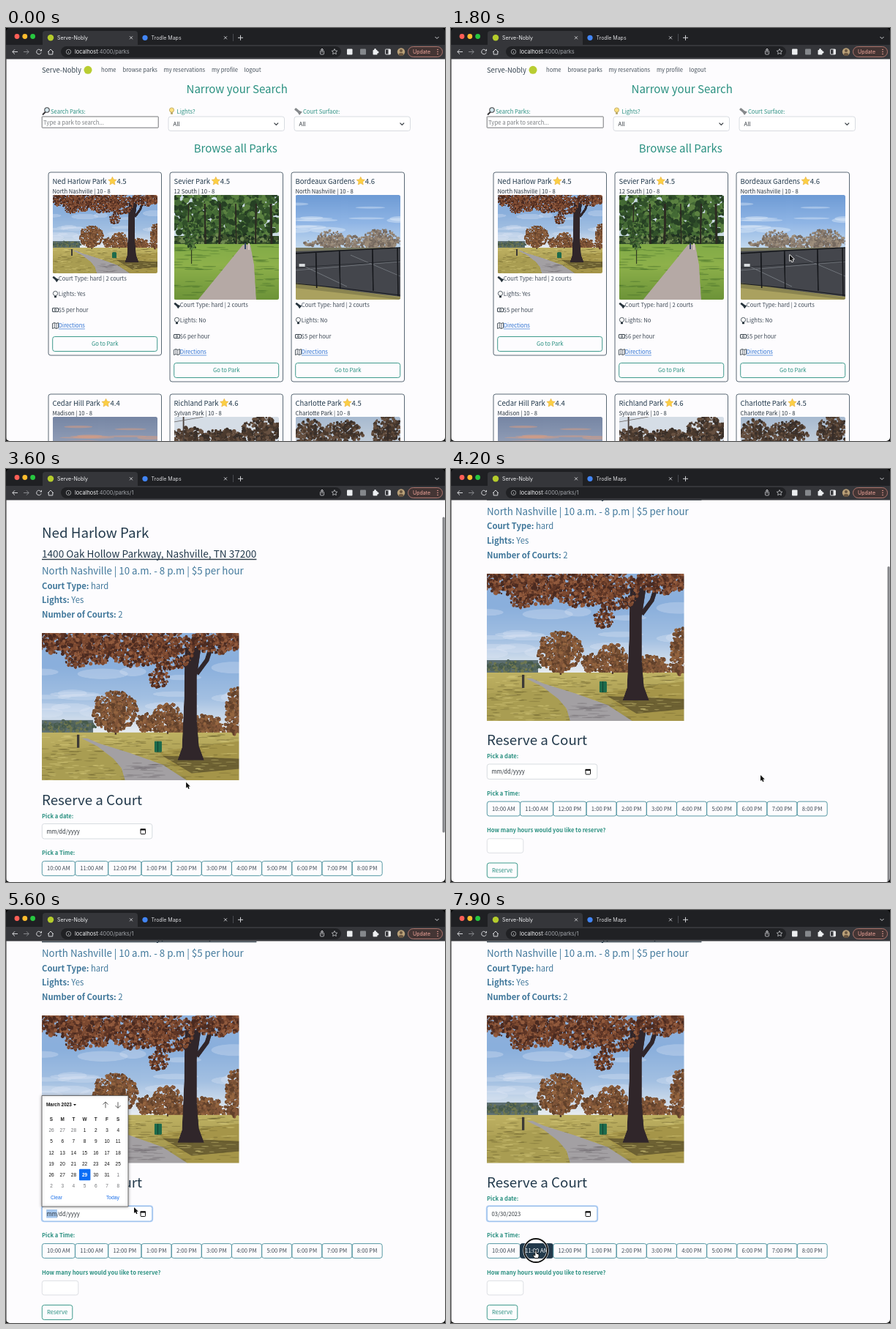
An HTML page with a canvas that plays this animation: 600x564 px, repeating every 8 s.

```html
<!DOCTYPE html>
<html lang="en">
<head>
<meta charset="utf-8">
<title>Court booking</title>
<style>
html, body { margin: 0; width: 100%; height: 100%; overflow: hidden; background: #000; }
canvas { display: block; width: 600px; height: 564px; }
</style>
</head>
<body>
<canvas id="stage"></canvas>
<script>
const W = 600, H = 564, LOOP = 8000, STEP = 100;
const PAGE = '"Noto Sans CJK JP", "Noto Sans CJK SC", "Noto Sans CJK", "Noto Sans", sans-serif';
const UI = 'Inter, Roboto, sans-serif';
const ARIAL = '"Liberation Sans", Arial, sans-serif';
const TEAL = '#2a9080', BLUE = '#41789b', NAVY = '#22394b', INK = '#3f4a56', PAPER = '#fdfcfe';
const SITE = 'Serve-Nobly', PARK = 'Ned Harlow Park';
const BODY = 7.64;

const stage = document.getElementById('stage');
const dpr = window.devicePixelRatio || 1;
stage.width = W * dpr;
stage.height = H * dpr;
let c = stage.getContext('2d');

let seed = 1;
const rnd = () => (seed = seed * 16807 % 2147483647) / 2147483647;
const clamp = v => Math.max(0, Math.min(1, v));
const ease = v => { v = clamp(v); return v * v * (3 - 2 * v); };

// ---------- drawing helpers ----------
function text(s, x, y, size, color, weight = 400, align = 'left', face = PAGE) {
  c.font = `${weight} ${size}px ${face}`;
  c.textAlign = align;
  c.fillStyle = color;
  c.fillText(s, x, y);
  return c.measureText(s).width;
}
function box(x, y, w, h, r, fill, stroke, lw = 0.9) {
  c.beginPath();
  c.roundRect(x, y, w, h, r);
  if (fill) { c.fillStyle = fill; c.fill(); }
  if (stroke) { c.strokeStyle = stroke; c.lineWidth = lw; c.stroke(); }
}
function rect(x, y, w, h, fill) { c.fillStyle = fill; c.fillRect(x, y, w, h); }
function oval(x, y, rx, ry, fill) {
  c.beginPath();
  c.ellipse(x, y, rx, ry, 0, 0, 7);
  c.fillStyle = fill;
  c.fill();
}
const dot = (x, y, r, fill) => oval(x, y, r, r, fill);
function ring(x, y, r, color, lw) {
  c.beginPath();
  c.arc(x, y, r, 0, 7);
  c.strokeStyle = color;
  c.lineWidth = lw;
  c.stroke();
}
// Points are "x,y x,y ..." strings.
function trace(pts, close) {
  c.beginPath();
  pts.split(' ').forEach((p, i) => {
    const [x, y] = p.split(',').map(Number);
    i ? c.lineTo(x, y) : c.moveTo(x, y);
  });
  if (close) c.closePath();
}
function line(pts, color, lw = 1) {
  trace(pts);
  c.strokeStyle = color;
  c.lineWidth = lw;
  c.stroke();
}
function poly(pts, fill) { trace(pts, true); c.fillStyle = fill; c.fill(); }
function at(x, y, draw, turn = 0) {
  c.save();
  c.translate(x, y);
  c.rotate(turn);
  draw();
  c.restore();
}
function fade(h, ...colors) {
  const g = c.createLinearGradient(0, 0, 0, h);
  colors.forEach((k, i) => g.addColorStop(i / (colors.length - 1), k));
  return g;
}

// ---------- photos as simple painted scenes ----------
function leaves(x, y, rx, ry, n, size, colors) {
  for (let i = 0; i < n; i++) {
    const a = rnd() * 6.283, d = Math.pow(rnd(), 0.6);
    dot(x + Math.cos(a) * d * rx, y + Math.sin(a) * d * ry, size * (0.5 + rnd()), colors[i % colors.length]);
  }
}
function streaks(n, x, y, w, h, len, color) {
  for (let i = 0; i < n; i++) oval(x + rnd() * w, y + rnd() * h, len * (0.5 + rnd()), 0.4 + rnd() * 0.5, color);
}
function paint(w, h, draw) {
  const cv = document.createElement('canvas');
  cv.width = w * 2;
  cv.height = h * 2;
  const main = c;
  c = cv.getContext('2d');
  c.scale(2, 2);
  seed = 77;
  draw(w, h);
  c = main;
  return cv;
}
const RUST = ['#5f3626', '#7c4930', '#4a2a20', '#915a3d'];
const AMBER = ['#765034', '#93643f', '#62412b', '#84573a'];
const GREEN = ['#31502a', '#446a35', '#263f24', '#5b8141'];
const BARE = ['#8b7d70', '#75695f', '#9d8e7c'];
const DARK = ['#4b3a2e', '#3a302a', '#665040'];

const autumn = paint(270, 202, (w, h) => {
  rect(0, 0, w, h, fade(135, '#8fb2dc', '#8aafdc', '#a3c0e2', '#e6ebf0'));
  for (let i = 0; i < 18; i++) oval(rnd() * w, 45 + rnd() * 65, 18 + rnd() * 25, 3 + rnd() * 5, 'rgba(225,233,243,.3)');
  rect(0, 119, 70, 17, '#5d6f72');
  leaves(35, 128, 40, 8, 180, 1.8, ['#52645c', '#6e7750', '#465a4c']);
  leaves(205, 130, 66, 8, 300, 2, AMBER);
  rect(0, 136, w, 66, fade(h, '#c4bd7b', '#c4bd7b', '#bfb263', '#9c8f48'));
  line('101,100 101,139', '#4a342a', 2.4);
  line('172,110 172,138', '#4a342a', 2);
  leaves(100, 107, 31, 28, 650, 1.8, AMBER);
  leaves(172, 116, 20, 20, 330, 1.7, AMBER);
  leaves(142, 123, 12, 13, 150, 1.6, AMBER);
  leaves(264, 106, 12, 33, 300, 1.8, AMBER);
  leaves(222, 124, 26, 12, 250, 1.7, AMBER);
  poly('0,165 70,156 108,176 120,202 0,202', '#a99d52');
  poly('160,162 270,148 270,202 200,202', '#a59549');
  poly('165,168 270,172 270,186 205,192', '#6d6133');
  streaks(200, 0, 139, w, 62, 6, 'rgba(92,82,38,.35)');
  streaks(120, 0, 139, w, 62, 6, 'rgba(226,212,133,.4)');
  poly('54,144 62,144 78,151 120,164 165,180 199,202 114,202 109,185 98,172 76,155', '#a3a0a3');
  streaks(25, 110, 178, 60, 20, 9, 'rgba(88,82,86,.3)');
  poly('196,20 218,20 212,60 212,120 215,155 222,174 186,174 192,157 195,90', '#30262a');
  line('212,56 226,37 234,12', '#30262a', 6);
  line('200,50 177,24 150,10', '#30262a', 3.5);
  leaves(28, 12, 38, 17, 380, 1.9, RUST);
  leaves(72, 19, 36, 24, 520, 1.9, RUST);
  leaves(48, 36, 16, 12, 110, 1.5, RUST);
  leaves(128, 19, 42, 27, 650, 1.9, RUST);
  leaves(176, 24, 32, 27, 450, 1.8, RUST);
  leaves(160, 62, 14, 13, 120, 1.5, RUST);
  leaves(240, 10, 36, 18, 400, 1.9, RUST);
  box(154, 148, 10, 15, 1, '#1d6a4b');
  line('159,148 159,163', '#123f31', 1);
  rect(48, 139, 3.5, 18, '#3c3936');
});
const lane = paint(143, 143, (w, h) => {
  rect(0, 0, w, h, '#cbdbe4');
  leaves(72, 25, 88, 40, 1300, 3, GREEN);
  rect(0, 56, w, 14, '#2f4929');
  leaves(70, 61, 75, 7, 250, 2, ['#1f3221', '#40572f', '#6e8850']);
  [20, 42, 63, 84, 112, 132].forEach((x, i) => line(`${x},12 ${x + (i % 2 ? 1 : -1)},71`, '#2c2b22', 1.6 + i % 3 * 0.7));
  rect(0, 67, w, 76, fade(h, '#6f9a3d', '#79a745', '#8eb14b', '#6c9338'));
  streaks(90, 0, 70, w, 70, 9, 'rgba(43,86,31,.35)');
  poly('94,68 104,68 109,95 112,143 33,143 64,105', '#b5a9a5');
  line('24,62 24,94', '#303a22', 1.2);
  leaves(24, 55, 11, 19, 200, 1.2, GREEN);
  rect(96, 66, 2, 8, '#384868');
  rect(101, 66, 2, 9, '#d6c8bf');
});
const courts = paint(143, 143, (w, h) => {
  rect(0, 0, w, h, fade(75, '#6e9bd5', '#8fb5e5', '#c6dbef'));
  for (let i = 0; i < 13; i++) oval(rnd() * w, 7 + rnd() * 42, 14 + rnd() * 20, 1 + rnd() * 3, 'rgba(240,246,253,.35)');
  leaves(80, 65, 70, 9, 320, 1.5, BARE);
  leaves(48, 60, 18, 12, 200, 1.2, BARE);
  leaves(116, 61, 25, 14, 300, 1.3, BARE);
  rect(0, 72, w, 5, '#76765f');
  poly('0,77 143,73 143,143 0,122', '#44464c');
  line('0,103 143,91', '#777c82', 0.7);
  line('7,95 70,125', '#777c82', 0.7);
  line('75,82 143,111', '#777c82', 0.7);
  poly('0,121 62,129 143,139 143,143 0,143', '#aaa15f');
  poly('0,120 143,140 143,143 0,127', '#8a8450');
  line('0,80 60,76 143,72', '#15171b', 1.5);
  line('0,99 143,90', '#22252a', 0.7);
  line('0,121 61,127 143,137', '#191b20', 1);
  [[28, 79, 127], [60, 76, 128], [105, 74, 131], [139, 72, 138]].forEach(([x, a, b]) => line(`${x},${a} ${x + 1},${b}`, '#15171b', 1.6));
  rect(5, 94, 8, 4, '#d7dadd');
});
const sunset = paint(143, 143, (w, h) => {
  rect(0, 0, w, h, fade(60, '#7686a4', '#8d9ab4', '#a69aa5'));
  for (let i = 0; i < 12; i++) oval(35 + rnd() * 100, 10 + rnd() * 28, 16 + rnd() * 18, 1 + rnd() * 2, 'rgba(222,157,128,.5)');
});
const grove = paint(143, 143, (w, h) => {
  rect(0, 0, w, h, '#d5dde6');
  leaves(20, 32, 27, 18, 260, 2, DARK);
  leaves(66, 33, 30, 17, 300, 2, DARK);
  leaves(120, 25, 31, 25, 400, 2, DARK);
  line('13,0 13,40', '#4a403b', 1.8);
  line('0,7 40,0', '#66615f', 0.7);
});
const dusk = paint(143, 143, (w, h) => {
  rect(0, 0, w, h, fade(50, '#a7bad0', '#d0d7df'));
  leaves(20, 25, 20, 22, 280, 1.7, DARK);
  leaves(65, 25, 27, 21, 330, 1.7, DARK);
  leaves(126, 21, 22, 24, 330, 1.7, DARK);
  line('126,10 126,40', '#352b27', 2);
});
function photo(img, x, y, w, h, r) {
  c.save();
  c.beginPath();
  c.roundRect(x, y, w, h, r);
  c.clip();
  c.drawImage(img, x, y, w, h);
  c.restore();
}

// ---------- icons ----------
function star(x, y, r, fill) {
  c.beginPath();
  for (let i = 0; i < 10; i++) {
    const a = i * Math.PI / 5 - Math.PI / 2, d = i % 2 ? r * 0.48 : r;
    c.lineTo(x + Math.cos(a) * d, y + Math.sin(a) * d);
  }
  c.closePath();
  if (fill) { c.fillStyle = fill; c.fill(); }
  c.strokeStyle = fill ? '#e3a22d' : '#c5c7ca';
  c.lineWidth = fill ? 0.5 : 0.8;
  c.stroke();
}
function lens(x, y) {
  line(`${x},${y + 1} ${x - 4},${y + 5}`, '#302f32', 1.8);
  dot(x + 2, y - 1.5, 3.2, '#d5e7ed');
  ring(x + 2, y - 1.5, 3.2, '#47484c', 1.1);
}
function bulb(x, y, fill, edge) {
  dot(x, y - 1, 3.1, fill);
  ring(x, y - 1, 3.1, edge, 0.8);
  rect(x - 1.5, y + 2.2, 3, 2.5, edge);
}
function torch(x, y, k, color) {
  at(x, y, () => {
    c.scale(k, k);
    box(-4.5, -1.5, 6, 3, 0.8, color);
    poly('1,-1.5 4.5,-2.6 4.5,2.6 1,1.5', color);
  }, 0.7);
}
function bill(x, y) {
  box(x - 4, y - 2.5, 8, 5, 0.5, null, '#26333c', 0.9);
  ring(x, y, 1.2, '#26333c', 0.8);
}
function map(x, y) {
  trace(`${x - 4},${y - 3} ${x - 1.3},${y - 4} ${x + 1.3},${y - 3} ${x + 4},${y - 4} ${x + 4},${y + 3} ${x + 1.3},${y + 4} ${x - 1.3},${y + 3} ${x - 4},${y + 4}`, true);
  c.strokeStyle = '#26333c';
  c.lineWidth = 0.8;
  c.stroke();
  line(`${x - 1.3},${y - 4} ${x - 1.3},${y + 3}`, '#26333c', 0.7);
  line(`${x + 1.3},${y - 3} ${x + 1.3},${y + 4}`, '#26333c', 0.7);
}
const cross = (x, y, r, color) => {
  line(`${x - r},${y - r} ${x + r},${y + r}`, color, 0.9);
  line(`${x + r},${y - r} ${x - r},${y + r}`, color, 0.9);
};

// ---------- browser frame ----------
function browser(path) {
  const icon = '#d3d4d7';
  rect(0, 0, W, 23, '#1f2023');
  ['#ff5f57', '#febc2e', '#28c840'].forEach((k, i) => dot(15 + i * 10.8, 11.5, 3.4, k));
  box(50, 4, 130, 24, 4, '#35363a');
  dot(61, 13.3, 4.2, '#b5cc2c');
  text(SITE, 70, 15.8, 7, '#f0f1f3', 400, 'left', UI);
  cross(171, 13.3, 2, icon);
  dot(190, 13.3, 3.6, '#4285f4');
  text('Trodle Maps', 198.5, 15.8, 7, '#d9dadd', 400, 'left', UI);
  cross(300, 13.3, 2, icon);
  line('310.5,8 310.5,18', '#55575c', 0.8);
  line('317,13.3 324,13.3', icon);
  line('320.5,9.8 320.5,16.8', icon);
  line('586.5,12 589,14.5 591.5,12', icon);

  rect(0, 23, W, 19.5, '#35363a');
  line('16,32.5 9,32.5', icon);
  line('12,29.3 8.8,32.5 12,35.7', icon);
  line('24,32.5 31,32.5', '#85878b');
  line('28,29.3 31.2,32.5 28,35.7', '#85878b');
  c.beginPath();
  c.arc(45, 32.5, 3.2, 0.3, 5.5);
  c.strokeStyle = icon;
  c.stroke();
  poly('46,31.5 49,28.5 49,31.5', icon);
  line('57,33 61,29 65,33', icon);
  line('58.2,32 58.2,36 63.8,36 63.8,32', icon);
  box(75, 25, 383, 15, 7.5, '#202124');
  ring(85.5, 32.5, 3.2, '#b8babd', 0.8);
  line('85.5,32 85.5,34.2', '#b8babd', 0.8);
  const w = text('localhost', 94, 35, 7.4, '#f1f2f3', 400, 'left', UI);
  text(':4000' + path, 94 + w, 35, 7.4, '#a2a5aa', 400, 'left', UI);
  box(429.5, 31, 5, 5, 0.8, null, icon, 0.8);
  line('432,34 432,28', icon, 0.8);
  line('430.2,30 432,28 433.8,30', icon, 0.8);
  star(449, 32.5, 4);
  box(466, 28.5, 7.5, 8, 1, '#eceef0');
  box(484, 28.5, 8, 8, 1, '#85888c');
  box(501.5, 30, 6, 6.5, 0.8, '#eef0f2');
  dot(504.5, 29.5, 1.5, '#eef0f2');
  dot(508, 33, 1.5, '#eef0f2');
  box(518.5, 29, 7, 7, 0.8, null, '#e9eaec');
  rect(522.5, 29, 3, 7, '#e9eaec');
  dot(540, 32.5, 5.2, '#b9a078');
  dot(540, 31, 2, '#695541');
  oval(540, 36, 3.2, 2, '#695541');
  box(549.5, 25.5, 47, 14, 7, '#443534', '#c9867c', 0.8);
  text('Update', 556, 35, 7, '#f0a69b', 400, 'left', UI);
  [29.5, 32.5, 35.5].forEach(y => dot(590, y, 0.8, '#f0a69b'));
}
function corners() {
  c.beginPath();
  c.rect(0, 0, W, H);
  c.roundRect(0, 0, W, H, 5);
  c.fillStyle = '#000';
  c.fill('evenodd');
  rect(0, 42, 0.6, H, '#444');
}

// ---------- pages ----------
function nav() {
  text(SITE, 49, 61.3, 9.4, '#34434f');
  dot(112, 57.3, 5.5, '#b9cd32');
  [['home', 130], ['browse parks', 159.5], ['my reservations', 215.5], ['my profile', 281], ['logout', 325.5]]
    .forEach(([s, x]) => text(s, x, 60.3, BODY, '#46515b'));
}
function select(x) {
  box(x, 121, 158.5, 19.5, 3, '#fff', '#ced4da', 0.8);
  text('All', x + 6.5, 133.6, BODY, '#30373d');
  line(`${x + 144.5},129.6 ${x + 147.3},132.4 ${x + 150.1},129.6`, '#343a40', 1.2);
}
function button(s, x, y, w, color, on) {
  box(x, y, w, 20, 3, on ? color : null, color);
  text(s, x + w / 2, y + 12.8, BODY, on ? '#fff' : color, 400, 'center');
}
const cards = [
  [PARK, '4.5', 'North Nashville', autumn, 107, 'Yes', 5],
  ['Sevier Park', '4.5', '12 South', lane, 143, 'No', 6],
  ['Bordeaux Gardens', '4.6', 'North Nashville', courts, 143, 'No', 5],
  ['Cedar Hill Park', '4.4', 'Madison', sunset, 143, 'No', 5],
  ['Richland Park', '4.6', 'Sylvan Park', grove, 143, 'No', 5],
  ['Charlotte Park', '4.5', 'Charlotte Park', dusk, 143, 'No', 5]
];
function card([name, rate, area, img, h, lights, price], i, on) {
  at(58 + i % 3 * 166, i > 2 ? 500 : 197, () => {
    const b = 31 + h;
    box(0, 0, 154.5, b + 112, 3, PAPER, '#485866');
    const w = text(name + ' ', 5.5, 16, 9.5, NAVY);
    star(11.2 + w, 12.2, 6, '#fbcf45');
    text(rate, 17.2 + w, 16, 9.5, NAVY);
    text(area + ' | 10 - 8', 5.5, 28.6, BODY, '#26333d');
    photo(img, 5.5, 31, 143.5, h, 2.5);
    torch(9.5, b + 7.5, 0.95, '#26333c');
    text('Court Type: hard | 2 courts', 13.8, b + 9.7, BODY, INK);
    bulb(9.5, b + 28.5, '#fff', '#26333c');
    text('Lights: ' + lights, 13.8, b + 31, BODY, INK);
    bill(9.5, b + 50);
    text(`$${price} per hour`, 13.8, b + 52.6, BODY, INK);
    map(9.5, b + 71.5);
    const d = text('Directions', 13.8, b + 74.2, BODY, '#2b70d2');
    rect(13.8, b + 75.6, d, 0.7, '#2b70d2');
    button('Go to Park', 5.7, b + 86.5, 143, TEAL, on);
  });
}
function parks(t) {
  nav();
  text('Narrow your Search', 315.7, 89, 15.02, TEAL, 400, 'center');
  lens(54, 113.5);
  text('Search Parks:', 61, 117, BODY, TEAL);
  box(49.2, 121, 159, 15.2, 0.5, '#fff', '#747679', 1);
  text('Type a park to search...', 51, 131.5, 7.75, '#7d8084');
  bulb(226.5, 113, '#ffe180', '#b5a261');
  text('Lights?', 233.5, 117, BODY, TEAL);
  select(222);
  torch(399, 113.5, 1.15, '#85888b');
  text('Court Surface:', 406, 117, BODY, TEAL);
  select(394);
  text('Browse all Parks', 313.7, 170, 15.02, TEAL, 400, 'center');
  cards.forEach((k, i) => card(k, i, i === 0 && t >= 2500));
}
function fact(label, value, y) {
  const w = text(label + ' ', 49, y, 11.25, BLUE, 700);
  text(value, 49 + w, y, 11.25, BLUE);
}
function dateField(t) {
  const focus = t >= 5000, picked = t >= 6500, marked = focus && t < 7800;
  if (focus) box(47.8, 403.3, 153.4, 23, 4, '#b9d3f5');
  box(49.3, 404.5, 150.5, 20.5, 3, '#fff', focus ? '#86b3e8' : '#d3d8dd', 0.9);
  const parts = picked ? ['03', '/30/2023'] : ['mm', '/dd/yyyy'];
  c.font = `400 ${BODY}px ${PAGE}`;
  const w = c.measureText(parts[0]).width;
  if (marked) rect(55.2, 409, w + 0.6, 11.5, '#a4c6ed');
  text(parts[0], 55.5, 417.7, BODY, '#30373d');
  text(parts[1], 55.5 + w, 417.7, BODY, '#30373d');
  box(184, 412, 6.5, 6.5, 0.7, null, '#111', 1);
  rect(183.6, 411.3, 7.3, 2.2, '#111');
}
function calendar() {
  c.save();
  c.shadowColor = 'rgba(0,0,0,.35)';
  c.shadowBlur = 4;
  box(49, 253.5, 118, 151.5, 0, '#fff', '#555', 0.8);
  c.restore();
  text('March 2023', 55, 268.3, 6.4, '#111', 700, 'left', ARIAL);
  poly('92,265 96,265 94,267.3', '#111');
  [[136, 1], [153, -1]].forEach(([x, d]) => {
    line(`${x},${266.3 - 4 * d} ${x},${266.3 + 4 * d}`, '#333', 0.8);
    line(`${x - 3.5},${266.3 - 0.7 * d} ${x},${266.3 - 4.2 * d} ${x + 3.5},${266.3 - 0.7 * d}`, '#333', 0.8);
  });
  [...'SMTWTFS'].forEach((s, i) => text(s, 62 + i * 15.2, 287.8, 6.4, '#222', 700, 'center', ARIAL));
  for (let i = 0; i < 42; i++) {
    const day = i - 2, x = 62 + i % 7 * 15.2, y = 303.3 + Math.floor(i / 7) * 15.1;
    const inside = day > 0 && day < 32, today = day === 29;
    if (today) box(x - 7.6, y - 10, 15.4, 15.6, 1, '#0b6df5');
    const label = day < 1 ? day + 28 : day > 31 ? day - 31 : day;
    text(label, x, y, 6.5, today ? '#fff' : inside ? '#111' : '#75777a', today ? 700 : 400, 'center', ARIAL);
  }
  text('Clear', 61, 395.3, 6.7, '#1a6fe8', 400, 'left', ARIAL);
  text('Today', 137, 395.3, 6.7, '#1a6fe8', 400, 'left', ARIAL);
}
const hours = ['10:00 AM', '11:00 AM', '12:00 PM', ...Array.from({ length: 8 }, (_, i) => `${i + 1}:00 PM`)];
function detail(t) {
  const scroll = 110 * ease((t - 3400) / 600) - 1.5 * ease((t - 4250) / 300);
  at(0, -scroll, nav);
  at(0, 108.5 - scroll, () => {
    text(PARK, 49, 14, 18.76, NAVY);
    const w = text('1400 Oak Hollow Parkway, Nashville, TN 37200', 49, 41.3, 13.6, NAVY);
    rect(49, 42.7, w, 1.5, '#34424d');
    text('North Nashville | 10 a.m. - 8 p.m | $5 per hour', 49, 64, 13.3, BLUE);
    fact('Court Type:', 'hard', 83.7);
    fact('Lights:', 'Yes', 103.4);
    fact('Number of Courts:', '2', 123);
    photo(autumn, 49, 144, 269.5, 201.5, 0);
    text('Reserve a Court', 49, 378.6, 18.76, NAVY);
    text('Pick a date:', 49, 396.8, BODY, TEAL, 700);
    dateField(t);
    text('Pick a Time:', 49, 447.2, BODY, TEAL, 700);
    let x = 49.3;
    hours.forEach((s, i) => {
      const on = i === 1 && t >= 7400;
      c.font = `400 ${BODY}px ${PAGE}`;
      const bw = c.measureText(s).width + 13.6;
      box(x, 455.6, bw, 19.8, 3, on ? NAVY : null, on ? NAVY : '#458e9a');
      text(s, x + bw / 2, 468.3, BODY, on ? '#fff' : INK, 400, 'center');
      x += bw;
    });
    text('How many hours would you like to reserve?', 49, 497.6, BODY, TEAL, 700);
    box(49.3, 506.3, 49.5, 19.5, 3, '#fff', '#d5d9de', 0.8);
    button('Reserve', 49.3, 539.5, 41.5, TEAL);
    if (t >= 5000 && t < 6500) calendar();
  });
  if (t >= 3400 && t < 4500) box(596.5, 42 + 91 * scroll / 110, 3.2, 431, 1.6, '#85868a');
}

// ---------- pointer ----------
const path = [
  [900, 604, 262], [1700, 463, 310], [1800, 463, 310], [2500, 150, 433], [3400, 150, 433],
  [3900, 423, 418], [4300, 423, 418], [4800, 187, 413], [5100, 187, 413], [5500, 175, 406],
  [5700, 175, 406], [6200, 124, 360], [6600, 124, 360], [7100, 126, 364], [7500, 116, 466]
];
const clicks = [2900, 4900, 6400, 7800];
function pointerAt(t) {
  const i = path.findIndex(k => k[0] > t);
  if (i < 0) return path[path.length - 1].slice(1);
  const a = path[i - 1], b = path[i], k = ease((t - a[0]) / (b[0] - a[0]));
  return [a[1] + (b[1] - a[1]) * k, a[2] + (b[2] - a[2]) * k];
}
function pointer(t) {
  if (t < 900) return;
  const [x, y] = pointerAt(t);
  if (clicks.some(k => t >= k && t < k + 200)) {
    ring(x, y - 1, 16, 'rgba(255,255,255,.8)', 3.4);
    ring(x, y - 1, 16, '#111', 1.9);
  }
  at(x, y, () => {
    c.lineJoin = 'round';
    if ((t >= 2500 && t < 3000) || t >= 7400) {
      trace('-1.2,0 0,-1 1,0 1,3 4,4 4.2,7 3,9.5 -1.5,9.5 -4,6 -3.3,4.8 -1.2,6', true);
      c.fillStyle = '#fff';
      c.fill();
      c.strokeStyle = '#111';
      c.lineWidth = 1;
      c.stroke();
    } else if (t >= 6600) {
      [['#fff', 2], ['#222', 0.9]].forEach(([k, lw]) => {
        line('0,-4 0,5', k, lw);
        line('-1.8,-4.8 0,-4 1.8,-4.8', k, lw);
        line('-1.8,5.8 0,5 1.8,5.8', k, lw);
      });
    } else {
      trace('0,0 0,8 1.9,6.4 3.1,9.2 4.6,8.6 3.4,5.8 5.8,5.8', true);
      c.strokeStyle = '#fff';
      c.lineWidth = 1.6;
      c.stroke();
      c.fillStyle = '#111';
      c.fill();
    }
  });
}

function draw(t) {
  const open = t >= 3000;
  c.setTransform(dpr, 0, 0, dpr, 0, 0);
  c.textBaseline = 'alphabetic';
  c.lineJoin = 'miter';
  rect(0, 0, W, H, PAPER);
  (open ? detail : parks)(t);
  browser(open ? '/parks/1' : '/parks');
  pointer(t);
  corners();
}

const start = performance.now();
function tick() {
  const t = (performance.now() - start) % LOOP;
  draw(Math.floor(t / STEP) * STEP);
  requestAnimationFrame(tick);
}
tick();
</script>
</body>
</html>
```
